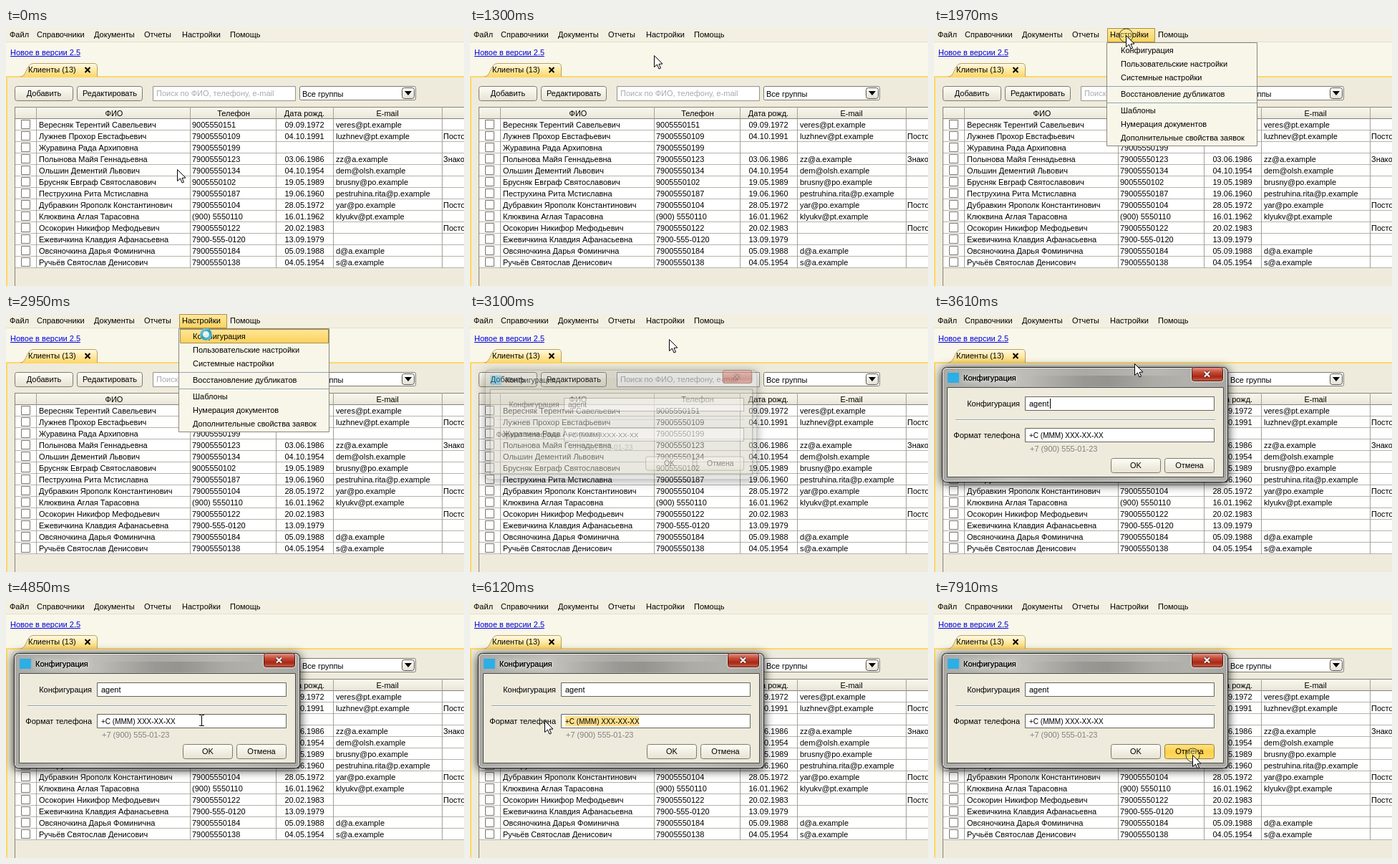
An HTML page with a canvas that plays this animation: 640x360 px, repeating every 8000 ms.

```html
<!DOCTYPE html>
<html lang="ru">
<head>
<meta charset="utf-8">
<style>
html, body { margin: 0; width: 100%; height: 100%; overflow: hidden; background: #f9f7ea; }
canvas { display: block; width: 640px; height: 360px; }
</style>
</head>
<body>
<canvas id="stage" width="640" height="360"></canvas>
<script>
const ctx = document.getElementById('stage').getContext('2d');
const LOOP = 8000;
const FONT = '"Liberation Sans", Arial, sans-serif';
const CREAM = '#f9f7ea', PANEL = '#eeebdc', GOLD = '#ffd766', INK = '#000';

const clients = [
  ['Вересняк Терентий Савельевич', '9005550151', '09.09.1972', 'veres@pt.example', ''],
  ['Лужнев Прохор Евстафьевич', '79005550109', '04.10.1991', 'luzhnev@pt.example', 'Постоянный'],
  ['Журавина Рада Архиповна', '79005550199', '', '', ''],
  ['Полынова Майя Геннадьевна', '79005550123', '03.06.1986', 'zz@a.example', 'Знакомые'],
  ['Ольшин Дементий Львович', '79005550134', '04.10.1954', 'dem@olsh.example', ''],
  ['Брусняк Евграф Святославович', '9005550102', '19.05.1989', 'brusny@po.example', ''],
  ['Пеструхина Рита Мстиславна', '79005550187', '19.06.1960', 'pestruhina.rita@p.example', ''],
  ['Дубравкин Ярополк Константинович', '79005550104', '28.05.1972', 'yar@po.example', 'Постоянный'],
  ['Клюквина Аглая Тарасовна', '(900) 5550110', '16.01.1962', 'klyukv@pt.example', ''],
  ['Осокорин Никифор Мефодьевич', '79005550122', '20.02.1983', '', 'Постоянный'],
  ['Ежевичкина Клавдия Афанасьевна', '7900-555-0120', '13.09.1979', '', ''],
  ['Овсяночкина Дарья Фоминична', '79005550184', '05.09.1988', 'd@a.example', ''],
  ['Ручьёв Святослав Денисович', '79005550138', '04.05.1954', 's@a.example', '']
];
const columns = [42, 257, 377, 457, 609];
const bar = [['Файл', 5], ['Справочники', 43], ['Документы', 123], ['Отчеты', 193], ['Настройки', 246], ['Помощь', 313]];
const items = [['Конфигурация', 35], ['Пользовательские настройки', 54], ['Системные настройки', 73],
  ['Восстановление дубликатов', 96], ['Шаблоны', 119], ['Нумерация документов', 138],
  ['Дополнительные свойства заявок', 157]];

// start, end, steps, from, bend, to
const moves = [
  [570, 1570, 8, [239, 197], [228, 100], [268, 10]],
  [2110, 2810, 6, [268, 10], [271, 25], [279, 28]],
  [3100, 3100, 1, [279, 28], [279, 30], [278, 35]],
  [3370, 4030, 6, [278, 35], [283, 100], [275, 165]],
  [4180, 4440, 2, [275, 165], [274, 167], [273, 168]],
  [5410, 5710, 3, [273, 168], [186, 169], [99, 170]],
  [6120, 6120, 1, [99, 170], [102, 169], [104, 168]],
  [6260, 7050, 7, [104, 168], [230, 178], [361, 216]]
];
const presses = [[1970, 2110], [2810, 2950], [4440, 4580], [5260, 5980], [7910, 8000]];

const between = (t, a, b) => t >= a && t < b;
const inside = (p, x, y, w, h) => p[0] >= x && p[0] < x + w && p[1] >= y && p[1] < y + h;

function pointer(t) {
  let pos = moves[0][3];
  for (const [t0, t1, n, a, b, c] of moves) {
    if (t < t0) break;
    const done = n > 1 ? Math.floor((t - t0) / (t1 - t0) * (n - 1) + 0.001) + 1 : 1;
    const p = Math.min(1, done / n), e = p * p * (3 - 2 * p), r = 1 - e;
    pos = a.map((v, i) => r * r * v + 2 * r * e * b[i] + e * e * c[i]);
  }
  return pos.map(Math.round);
}

function text(s, x, y, color = INK, align = 'left', size = 11) {
  ctx.font = `${size}px ${FONT}`;
  ctx.textAlign = align;
  ctx.fillStyle = color;
  ctx.fillText(s, x, y);
}

function rect(x, y, w, h, color) {
  ctx.fillStyle = color;
  ctx.fillRect(x, y, w, h);
}

function grad(x0, y0, x1, y1, ...colors) {
  const g = ctx.createLinearGradient(x0, y0, x1, y1);
  colors.forEach((c, i) => g.addColorStop(i / (colors.length - 1), c));
  return g;
}

function box(x, y, w, h, fill, line, r = 0) {
  ctx.beginPath();
  ctx.roundRect(x + 0.5, y + 0.5, w - 1, h - 1, r);
  ctx.fillStyle = fill;
  ctx.fill();
  ctx.strokeStyle = line;
  ctx.lineWidth = 1;
  ctx.stroke();
}

function cross(x, y, r, color, width) {
  ctx.beginPath();
  ctx.moveTo(x - r, y - r); ctx.lineTo(x + r, y + r);
  ctx.moveTo(x + r, y - r); ctx.lineTo(x - r, y + r);
  ctx.strokeStyle = color;
  ctx.lineWidth = width;
  ctx.stroke();
}

function button(label, x, y, w, h, lit) {
  const fill = lit ? grad(0, y, 0, y + h, '#ffe48e', '#ffd04a', '#ffdc70')
    : grad(0, y, 0, y + h, '#fffef8', '#f2efe3', '#e6e2d3');
  box(x, y, w, h, fill, lit ? '#9a8030' : '#7d7a6e', 3);
  text(label, x + w / 2, y + 14, INK, 'center');
}

function drawTab() {
  rect(0, 67, 640, 2, GOLD);
  ctx.beginPath();
  ctx.moveTo(20, 68);
  ctx.bezierCurveTo(30, 67, 28, 49.5, 38, 49.5);
  ctx.lineTo(123, 49.5);
  ctx.quadraticCurveTo(127.5, 49.5, 127.5, 54);
  ctx.lineTo(127.5, 68);
  ctx.fillStyle = grad(0, 49, 0, 68, '#fffbea', '#ffe9a6', GOLD);
  ctx.fill();
  ctx.strokeStyle = '#b3a268';
  ctx.lineWidth = 1;
  ctx.stroke();
  text('Клиенты (13)', 31, 62);
  cross(114, 58.5, 3.5, INK, 2);
}

function drawTable() {
  rect(12, 110, 628, 17, grad(0, 110, 0, 127, '#faf8ef', '#e9e5d7'));
  rect(12, 110, 628, 1, '#85827a');
  rect(12, 126, 628, 1, '#85827a');
  [['ФИО', 151], ['Телефон', 318], ['Дата рожд.', 417], ['E-mail', 533]]
    .forEach(([s, x]) => text(s, x, 123, INK, 'center'));
  clients.forEach(([name, phone, date, mail, group], i) => {
    const y = 127 + i * 16;
    rect(12, y, 628, 16, '#fff');
    rect(12, y + 15, 628, 1, '#b5b2a8');
    box(21, y + 1, 13, 13, '#fff', '#77746a');
    text(name, 46, y + 12);
    text(phone, 260, y + 12);
    text(date, 417, y + 12, INK, 'center');
    text(mail, 461, y + 12);
    text(group, 611, y + 12);
  });
  columns.forEach(x => rect(x, 110, 1, 225, '#a3a095'));
  rect(12, 110, 1, 250, '#85827a');
}

function drawPage(lit) {
  rect(0, 0, 640, 360, CREAM);
  rect(0, 0, 640, 19, '#f3f0e1');
  rect(0, 19, 640, 1, '#e4e0d0');
  if (lit) box(242, 0, 67, 20, grad(0, 0, 0, 20, '#ffe9a0', '#fbd25c'), '#a8904a');
  bar.forEach(([s, x]) => text(s, x, 13));
  text('Новое в версии 2.5', 6, 38, '#0000dd');
  rect(6, 39, 98, 1, '#0000dd');
  rect(0, 69, 640, 291, PANEL);
  drawTab();
  rect(0, 69, 2, 291, GOLD);
  button('Добавить', 12, 81, 82, 21);
  button('Редактировать', 99, 81, 92, 21);
  box(205, 81, 200, 21, '#fff', '#96938a');
  text('Поиск по ФИО, телефону, e-mail', 210, 95, '#aaa');
  box(410, 81, 163, 20, '#fff', '#7d7a6e', 2);
  text('Все группы', 414, 96);
  box(553, 83, 18, 16, grad(0, 83, 0, 99, '#fff', '#e4e0d2'), '#55534a', 3);
  ctx.beginPath();
  ctx.moveTo(557, 88); ctx.lineTo(567, 88); ctx.lineTo(562, 94);
  ctx.fillStyle = INK;
  ctx.fill();
  drawTable();
}

function drawMenu(lit) {
  box(241, 20, 211, 145, '#f8f6e9', '#8a877b');
  if (lit) box(243, 21, 208, 20, grad(0, 21, 0, 41, '#ffe698', '#fbd15a'), '#a8904a');
  rect(242, 81, 209, 1, '#8fa3bd');
  rect(242, 104, 209, 1, '#8fa3bd');
  items.forEach(([s, y]) => text(s, 261, y));
}

// Shadow around a window, kept out of its see-through frame
function drawShadow(x, y, w, h) {
  ctx.save();
  ctx.beginPath();
  ctx.rect(-50, -50, 740, 460);
  ctx.roundRect(x, y, w, h, 6);
  ctx.clip('evenodd');
  ctx.shadowColor = 'rgba(0,0,0,.85)';
  ctx.shadowBlur = 14;
  ctx.shadowOffsetY = 2;
  ctx.beginPath();
  ctx.roundRect(x, y, w, h, 6);
  ctx.fillStyle = '#000';
  ctx.fill();
  ctx.restore();
}

function drawFrame(glass) {
  drawShadow(11, 74, 400, 161);
  ctx.save();
  ctx.globalAlpha *= glass;
  const fill = glass < 1 ? '#77776f'
    : grad(12, 0, 411, 0, '#a5a5a0', '#bcbbb5', '#a6a59f', '#b5b4ae', '#a3a29c');
  box(11, 74, 400, 161, fill, '#1c1c1c', 6);
  rect(130, 86, 226, 15, grad(130, 0, 356, 0, 'rgba(60,60,60,0)', 'rgba(60,60,60,.25)', 'rgba(60,60,60,0)'));
  box(12, 75, 398, 159, 'rgba(255,255,255,.05)', 'rgba(255,255,255,.7)', 5);
  ctx.restore();
  rect(19, 82, 16, 14, '#2caee6');
  ctx.save();
  ctx.shadowColor = '#fff';
  ctx.shadowBlur = 8;
  text('Конфигурация', 41, 93);
  text('Конфигурация', 41, 93);
  ctx.restore();
  box(359, 74, 46, 21, 'rgba(255,255,255,.3)', 'rgba(255,255,255,.7)', 4);
  box(360, 74, 44, 20, grad(0, 74, 0, 94, '#e5a193', '#c9503d', '#a52815', '#d2644a'), '#4a1a14', 3);
  cross(381.5, 84, 3.5, '#5a2a24', 4);
  cross(381.5, 84, 3.5, '#fff', 2.2);
}

function drawDialog(t, pos) {
  const opening = t < 3230 ? 0 : t < 3370 ? 1 : 2;
  ctx.save();
  const k = [0.95, 0.987, 1][opening];
  ctx.translate(212, 155);
  ctx.scale(k, k);
  ctx.translate(-212, -155);
  ctx.globalAlpha = opening ? 1 : 0.4;
  drawFrame(opening < 2 ? 0.5 : 1);
  box(18, 102, 387, 126, PANEL, '#4b4b48');

  text('Конфигурация', 120, 129, INK, 'right');
  box(127, 115, 265, 20, '#fff', '#66635a');
  text('agent', 133, 129);
  rect(30, 147, 363, 1, '#93a0ae');
  rect(30, 148, 363, 1, '#fff');
  text('Формат телефона', 120, 173, INK, 'right');
  box(127, 159, 265, 20, '#fff', '#66635a');

  const left = t < 5410 ? 236 : Math.max(133, Math.min(236, pos[0]));
  const caret = t < 6120 ? left : 133;
  if (between(t, 5410, 7910)) rect(caret, 162, 236 - caret, 14, '#ffe08c');
  text('+C (MMM) XXX-XX-XX', 133, 173, INK, 'left', 10);
  text('+7 (900) 555-01-23', 134, 192, '#808080');

  if (between(t, 3230, 3740) || between(t, 4180, 4440)) rect(162, 118, 1, 14, INK);
  if (between(t, 4440, 4850) || between(t, 5260, 6120) || between(t, 6570, 7050) || between(t, 7490, 7910))
    rect(caret, 162, 1, 14, INK);

  button('OK', 247, 201, 70, 21);
  button('Отмена', 322, 201, 70, 21, inside(pos, 322, 201, 70, 21));
  ctx.restore();
}

function drawArrow(x, y) {
  ctx.beginPath();
  [[0, 0], [0, 16], [4, 12.5], [6.5, 18.5], [9, 17.5], [6.5, 11.8], [11.5, 11.5]]
    .forEach(([dx, dy]) => ctx.lineTo(x + dx + 0.5, y + dy + 0.5));
  ctx.closePath();
  ctx.fillStyle = '#fff';
  ctx.fill();
  ctx.strokeStyle = '#000';
  ctx.lineWidth = 1;
  ctx.stroke();
}

function drawBeam(x, y) {
  rect(x, y - 7, 1, 15, '#000');
  for (const dy of [-8, 7]) {
    rect(x - 3, y + dy, 3, 1, '#000');
    rect(x + 1, y + dy, 3, 1, '#000');
  }
}

function drawRing(x, y) {
  ctx.beginPath();
  ctx.arc(x, y, 8.5, 0, 7);
  ctx.fillStyle = 'rgba(235,248,250,.9)';
  ctx.fill();
  ctx.beginPath();
  ctx.arc(x, y, 6.5, 0, 7);
  ctx.strokeStyle = grad(x - 8, y - 8, x + 8, y + 8, '#8fd8e6', '#2f9fba', '#6cc9dc');
  ctx.lineWidth = 4;
  ctx.stroke();
}

function drawPointer(t, pos) {
  const [x, y] = pos;
  if (between(t, 2950, 3100)) return drawRing(x + 0.5, y + 0.5);
  if (presses.some(([a, b]) => between(t, a, b))) {
    ctx.beginPath();
    ctx.arc(x + 0.5, y + 0.5, 9.5, 0, 7);
    ctx.fillStyle = 'rgba(255,240,150,.35)';
    ctx.fill();
    ctx.strokeStyle = '#4a4428';
    ctx.lineWidth = 1;
    ctx.stroke();
  }
  const fields = t >= 3230 && (inside(pos, 127, 115, 265, 20) || inside(pos, 127, 159, 265, 20));
  if (fields && t < 6260 || between(t, 5260, 5980)) drawBeam(x, y);
  else drawArrow(x, y);
}

function draw(t) {
  const pos = pointer(t);
  const open = between(t, 1970, 3100);
  drawPage(open || t < 1970 && inside(pos, 242, 0, 67, 20));
  if (open) drawMenu(pos[1] > 20);
  if (t >= 3100) drawDialog(t, pos);
  drawPointer(t, pos);
}

function tick() {
  draw(performance.now() % LOOP);
  requestAnimationFrame(tick);
}
tick();
</script>
</body>
</html>
```
